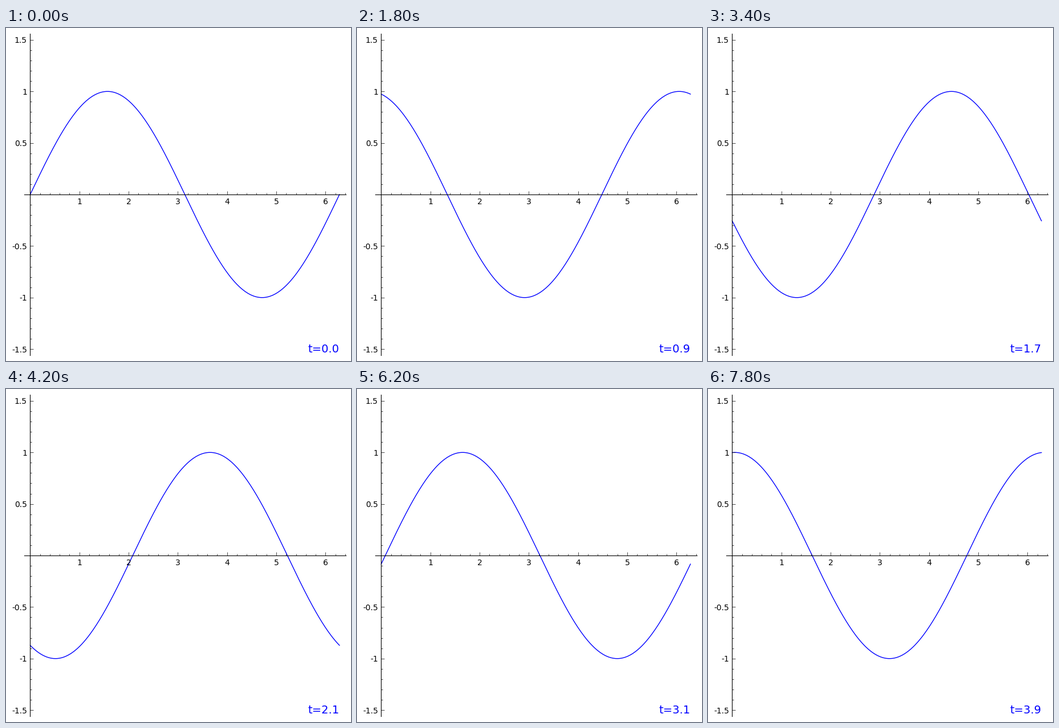
Animation of 605x584 px, one loop 8 s. Source, as a matplotlib script:

```python
import numpy as np
import matplotlib.pyplot as plt
from matplotlib.animation import FuncAnimation
from matplotlib.ticker import FuncFormatter, MultipleLocator

W, H, DPI = 605, 584, 100
FRAMES, INTERVAL = 40, 200
SIDE = 564                  # plot area, px
LEFT, TOP = 31.58, 10       # its corner, px
PERIOD = 2 * np.pi

plt.rcParams["font.family"] = "DejaVu Sans"
plt.rcParams["font.size"] = 10
plt.rcParams["text.kerning_factor"] = 6   # whole-pixel letter spacing

fig = plt.figure(figsize=(W / DPI, H / DPI), dpi=DPI, facecolor="white")
ax = fig.add_axes([LEFT / W, 1 - (TOP + SIDE) / H, SIDE / W, SIDE / H])
ax.set_xlim(-PERIOD / 50, PERIOD * 1.02)
ax.set_ylim(-1.56, 1.56)
ax.set_axisbelow(False)
ax.patch.set_visible(False)

for name in ("left", "bottom"):
    ax.spines[name].set_position(("data", 0))
    ax.spines[name].set_linewidth(0.8)
for name in ("right", "top"):
    ax.spines[name].set_visible(False)


def label(value, _):
    return "" if abs(value) < 1e-9 else f"{value:g}"


def set_ticks(axis, major, minor):
    axis.set_major_locator(MultipleLocator(major))
    axis.set_minor_locator(MultipleLocator(minor))
    axis.set_major_formatter(FuncFormatter(label))


set_ticks(ax.xaxis, 1, 0.2)
set_ticks(ax.yaxis, 0.5, 0.1)
ax.tick_params(which="major", direction="in", length=4, width=0.5, pad=4)
ax.tick_params(which="minor", direction="in", length=2, width=0.5)

x = np.linspace(0, PERIOD, 300)
wave, = ax.plot(x, np.sin(x), color="blue", lw=1)
clock = ax.text(PERIOD, -1.5, "t=0.0", color="blue", fontsize=14,
                ha="right", va="center")


def draw(frame):
    t = frame / 10
    wave.set_ydata(np.sin(x + 2 * t))
    clock.set_text(f"t={t:.1f}")
    return wave, clock


anim = FuncAnimation(fig, draw, frames=FRAMES, interval=INTERVAL,
                     init_func=lambda: draw(0), repeat=True, repeat_delay=0)
plt.show()
```
